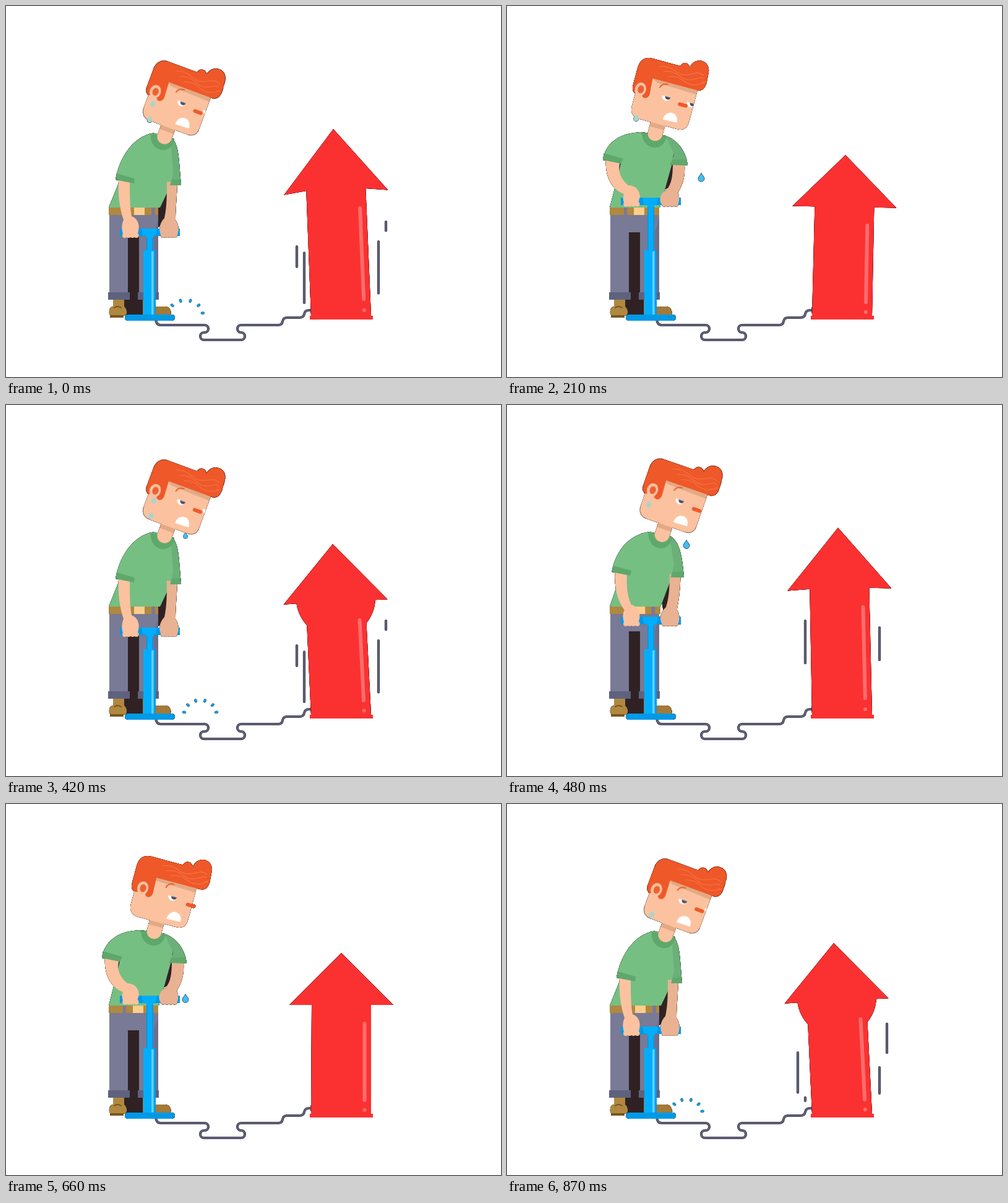
Write an HTML page that moves like this. It is 800 px wide and 600 px high and loops after 900 ms.

```html
<!DOCTYPE html>
<html lang="en">
<head>
<meta charset="utf-8">
<title>Pumping up</title>
<style>
html, body { margin: 0; width: 100%; height: 100%; overflow: hidden; background: #fff }
svg { display: block; width: 800px; height: 600px }
.edge { filter: drop-shadow(0 0 .5px #000) drop-shadow(0 0 .3px #000) }
</style>
</head>
<body>
<svg id="stage" viewBox="0 0 800 600"></svg>
<script>
const LOOP = 900, PUMP = 450, STEP = 30;
const SKIN = '#fcc29f', SKIN_DARK = '#e9b292', SKIN_SHADE = '#e3a984', HAIR = '#f05a28';
const SHIRT = '#76bf82', SHIRT_DARK = '#5fa86b', SLEEVE = '#6bb078';
const PANTS = '#787a96', CUFF = '#5f627e', BROWN = '#b08840', DARK = '#302224';
const BLUE = '#00aeff', BLUE_DARK = '#0099e6', RED = '#fb3131', LINE = '#62637b';

const stage = document.getElementById('stage');
const clamp = (v, a = 0, b = 1) => Math.min(b, Math.max(a, v));
const lerp = (a, b, k) => a + (b - a) * k;

// Blend two paths of the same structure.
function mix(a, b, k) {
  const to = b.match(/-?[\d.]+/g);
  let i = 0;
  return a.replace(/-?[\d.]+/g, n => lerp(+n, +to[i++], k).toFixed(2));
}

// Smooth value through [time, value] pairs.
function keys(t, pairs) {
  const i = Math.max(1, pairs.findIndex(k => k[0] >= t));
  const [t0, a] = pairs[i - 1], [t1, b] = pairs[i];
  const x = (t - t0) / (t1 - t0);
  return lerp(a, b, x * x * (3 - 2 * x));
}

const path = (d, fill) => `<path d="${d}" fill="${fill}"/>`;
const rect = (x, y, w, h, fill, r = 0) =>
  `<rect x="${x}" y="${y}" width="${w}" height="${h}" rx="${r}" fill="${fill}"/>`;
const oval = (x, y, rx, ry, fill) =>
  `<ellipse cx="${x}" cy="${y}" rx="${rx}" ry="${ry}" fill="${fill}"/>`;
const stroke = (d, color, width, extra = '') =>
  `<path d="${d}" fill="none" stroke="${color}" stroke-width="${width}" stroke-linecap="round" ${extra}/>`;
const outlined = d => stroke(d, '#3d3c4c', 4.2) + stroke(d, LINE, 2.4);
const group = (transform, body) => `<g transform="${transform}">${body}</g>`;
const clipped = (id, d, body) =>
  `<clipPath id="${id}"><path d="${d}"/></clipPath><g clip-path="url(#${id})">${body}</g>`;

function lift(u) {
  const half = PUMP / 2;
  const ease = x => 1 - (1 - x ** 1.2) ** 4.5;
  return u < half ? ease(u / half) : 1 - ease((u - half) / half);
}

function hose() {
  return outlined('M242 507Q243 516 250 516H321a6 6 0 0 1 0 12H320a6 6 0 0 0 0 12H380' +
    'a6 6 0 0 0 0-12a6 6 0 0 1 0-12H440q6 0 7-6q1-6 7-6H474q7 0 8-6q1-6 8-6H493') +
    rect(492, 487, 2, 10, '#3d3c4c');
}

function speedLines(t) {
  const w = t < 250 ? t + 420 : t <= 700 ? t : t - 480;
  // x, bottom, top, head start and end, tail start and end
  return [
    [614, 480, 349, 294, 395, 330, 431],
    [470, 480, 389, 330, 400, 381, 442],
    [602, 468, 360, 362, 434, 416, 540],
    [482, 480, 349, 388, 440, 425, 540],
  ].map(([x, low, high, h0, h1, t0, t1]) => {
    if (w < h0 || w > t1) return '';
    const head = lerp(low, high, clamp((w - h0) / (h1 - h0)));
    const tail = lerp(low, high, clamp((w - t0) / (t1 - t0)));
    return outlined(`M${x} ${head}V${tail}`);
  }).join('');
}

function arrow(t, u) {
  const lean = keys(t, [[0, -13], [90, 2], [210, 5], [330, -4], [420, -14], [540, 0],
    [660, 0], [780, -4], [870, -14], [900, -13]]);
  const tip = keys(u, [[0, 199], [90, 197], [210, 241], [330, 238], [420, 225], [450, 199]]);
  const wing = keys(u, [[0, 301.5], [90, 290], [210, 325], [330, 323], [420, 318.5], [450, 301.5]]);
  const notch = keys(u, [[0, 297], [90, 296], [210, 325], [330, 323], [420, 318], [450, 297]]);
  const mid = 542 + lean * .67, tilt = -lean * .3;
  const d = `M${542 + lean} ${tip}L${mid + 84} ${wing - tilt}L${mid + 48} ${notch - tilt / 2}` +
    `L590 501H593V507H491V501H493L${mid - 48} ${notch + tilt / 2}L${mid - 84} ${wing + tilt}Z`;
  // The bulge of air travels up the shaft and vanishes into the head.
  const bulgeY = 431 - (u - 330) * 1.32;
  const bulgeR = u < 270 ? 0 : Math.min(64, 507 - bulgeY) - Math.max(0, u - 420);
  const bulgeX = 542 + lean * .67 * (507 - bulgeY) / 200;
  const bulge = bulgeR > 0 ? clipped('shaft', `M440 ${wing - 4}H640V510H440Z`,
    oval(bulgeX, bulgeY, bulgeR, bulgeR, RED)) : '';
  const k = (notch - 297) / 28;
  const shine = `M${579.5 + lean * .57} ${notch + 30}L${579.5 + lean * .1} ${474 + 5 * k}`;
  return `<g class="edge">${bulge + path(d, RED)}</g>` +
    stroke(shine, '#ff6c6c', 6) + oval(579.5 + lean * .05, 492 + 3 * k, 3, 3, '#ff6c6c');
}

function teardrop(x, y, s, fill, line = 'none') {
  return group(`translate(${x} ${y}) scale(${s})`,
    `<path d="M0-7C1-4 5-1 5 2A5 5 0 0 1-5 2C-5-1-1-4 0-7Z" fill="${fill}" stroke="${line}"/>`);
}

function drips(t) {
  // x, start, gravity, landing, splash
  return [[314, 51, .00289, 368, 390], [290, 339, .00107, 845, 845]].map(([x, start, g, land, burst]) => {
    let out = '';
    const age = t - start;
    if (age > 0 && t < land)
      out += teardrop(x, 204 + g * age * age, clamp(age / 110), '#45bdf0', '#24566c');
    const since = (t - burst + LOOP) % LOOP;
    if (since < 70) {
      const r = 24 + since * .075;
      for (let i = 0; i < 6; i++) {
        const deg = 8 + i * 32.8, a = deg * Math.PI / 180;
        out += group(`translate(${x + r * Math.cos(a)} ${500 - r * .86 * Math.sin(a)}) rotate(${-deg})`,
          `<ellipse rx="3" ry="2" fill="#12a4e4" stroke="#1c5f80" stroke-width=".7"/>`);
      }
    }
    return out;
  }).join('');
}

function legs(p) {
  const shoe = 'M173 474H191V486Q196 491 195 497Q194 501 188 501H170Q166 500 167 492Q168 487 173 486Z';
  return rect(191, 470, 32, 30, DARK) + rect(196, 364, 20, 110, DARK) +
    path(shoe, BROWN) + rect(168, 500, 22, 4, '#7a5520', 1) +
    stroke('M175 488Q180 484 186 488', '#7a5520', 2) +
    path('M221 474H236V486H258Q267 487 267 500H221Z', '#a37a38') +
    path('M167 336H246V466H215V366H197V466H167Z', PANTS) +
    path('M246 345V466H238L239 366Z', '#6d6f8a') +
    rect(165, 463, 35, 12, CUFF) + rect(213, 463, 34, 12, CUFF) +
    rect(166, 325, lerp(83, 80, p), 13, BROWN) +
    rect(189, 325, 5, 13, PANTS) + rect(lerp(235, 230, p), 325, 6, 13, PANTS) +
    rect(lerp(207, 205, p), 325, 17, 13, '#ffcd8b');
}

function shirt(p) {
  return path(mix('M262 284L260 345L246 358L246 318Z', 'M264 250L271 262L266 290L255 297Z', p), DARK) +
    path(mix('M190 270L192 280L194 290L200 280Z', 'M190 242L177 254L181 270L188 276Z', p), DARK) +
    path(mix('M166 326L183 284L212 240L240 206L266 212L276 250L266 290L249 326Z',
      'M166 326L180 272L188 235L218 205L256 210L270 235L266 258L247 326Z', p), SHIRT);
}

function pump(p) {
  const y = 366 - 50 * p;
  return rect(227, y, 11, 398 - y, BLUE_DARK) + rect(229, y, 7, 398 - y, BLUE) +
    rect(222, 395, 20, 106, BLUE) + rect(235, 397, 3.5, 102, '#62cfff') + rect(239.5, 395, 2.5, 106, BLUE_DARK) +
    rect(192, 499, 81, 10, BLUE_DARK, 5) +
    rect(184, y - 6, 97, 12, BLUE_DARK, 1) +
    path(`M211 ${y - 6}H252L249 ${y + 5}H239L237 ${y + 9}H228L226 ${y + 5}H214Z`, BLUE) +
    path(`M211 ${y - 6}h8l2 11h-7ZM252 ${y - 6}h-8l-2 11h7Z`, BLUE_DARK);
}

function arms(p) {
  const y = 371 - 50.5 * p;
  const knuckles = (x, color) => stroke(`M${x} ${y}h19`, color, 8, 'stroke-dasharray="0 6.2"');
  return path(mix('M260 284L277 286C276 310 274 330 274 346C280 354 280 366 276 372L252 372C246 366 247 352 256 343C260 325 260 305 260 284Z',
    'M268 254L287 256C288 275 285 288 276 302C279 308 279 316 276 321L250 321C245 315 247 303 258 297C266 288 268 275 268 254Z', p), SKIN_DARK) +
    knuckles(254, SKIN_DARK) +
    path(mix('M182 280L200 283C200 305 200 325 203 340C214 344 216 355 214 364L212 371L190 371C186 362 187 352 190 346C183 325 181 305 182 280Z',
      'M160 247L183 252C178 268 184 280 196 290C208 290 214 298 215 308L212 319L190 319C187 316 187 308 189 304C168 296 158 275 160 247Z', p), SKIN) +
    knuckles(192, SKIN);
}

function sleeves(p) {
  return path(mix('M266 212C280 222 279 245 283 289L266 289L270 270C279 250 274 230 266 212Z',
      'M256 210C278 217 290 238 292 257L264 257C270 240 268 225 256 210Z', p), SLEEVE) +
    path(mix('M268 281L282 280L283 290L265 290Z', 'M267 249L290 248L292 258L263 257Z', p), SHIRT_DARK) +
    path(mix('M177 281C182 250 202 211 240 205L235 250L208 282Z', 'M155 249C158 225 178 205 218 204L200 240L186 250Z', p), SHIRT) +
    path(mix('M179 271L208 279L207 287L177 281Z', 'M157 238L188 247L184 255L155 249Z', p), SHIRT_DARK) +
    path(mix('M234 206C232 226 246 234 256 233C266 232 272 222 272 215Z',
      'M218 204C218 222 230 229 239 229C248 229 257 222 257 210Z', p), SHIRT_DARK);
}

function head(t, u, p) {
  const turn = keys(t, [[0, .37], [210, 0], [330, .15], [420, .33], [540, .82], [660, 1], [870, .42], [900, .37]]);
  const angle = keys(u, [[0, 20.3], [90, 15.8], [210, 15], [330, 8.5], [420, 20.3], [450, 20.3]]);
  const slide = (n, body) => group(`translate(${n * turn} 0)`, body);
  const face = 'M-48-100V-40Q-48-22-30-22H32Q48-22 48-38V-100Z';
  const hair = mix('M-48 -60C-53 -62 -55 -66 -55 -75L-55 -100C-55 -115 -48 -122 -36 -122L11 -122C13 -131 23 -131 26 -124C30 -145 58 -144 58 -121L59 -107C59 -97 55 -91 47 -91L-27 -91L-25 -65C-26 -55 -36 -55 -37 -62Z',
    'M-48 -60C-53 -62 -55 -66 -55 -75L-55 -100C-55 -115 -48 -122 -36 -122L17 -122C19 -131 29 -131 33 -124C37 -145 65 -144 65 -121L66 -107C66 -97 62 -91 54 -91L-19 -91L-18 -65C-19 -55 -29 -55 -30 -62Z', turn);
  const eye = x => path(`M${x - 7}-68.500h14a7 7 0 0 1-14 0Z`, '#fff') +
    path(`M${x - 2}-68.500h9a4.500 4.500 0 0 1-9 0Z`, '#4d4e66');
  const strands = [-112, -106, -100].map((y, i) =>
    stroke(`M${-22 + i * 9} ${y}q14-6 27 0t26-2t${20 - i * 9}-3`, '#f67a48', 1)).join('');
  const slip = (t + 190) % PUMP, slip2 = (t + 30) % PUMP;
  const sweat = (x, y) => teardrop(x, y, .85, '#a9d5cb');
  return group(`translate(${lerp(254.3, 238, p)} ${lerp(217, 212, p)}) rotate(${angle})`,
    rect(-12, -32, 24, 38, SKIN, 12) + rect(-12, -23, 24, 8, SKIN_SHADE) +
    path(face, SKIN) +
    clipped('face', face, path('M-28-92H48V-84L-18-86Z', SKIN_SHADE) + slide(20, eye(43.5))) +
    path(hair, '#ef5829') + slide(7, strands) +
    slide(5.5, oval(-41.5, -69, 9, 11, SKIN) + oval(-41, -69, 5, 6.5, '#ee6034')) +
    slide(12, eye(2) + stroke('M-12-80Q-10-88-1-88', HAIR, 2)) +
    slide(8, path('M6-31C6-50 29-50 29-32Z', '#fff')) +
    slide(15, stroke('M26-62H36', HAIR, 6)) +
    (slip < 215 ? sweat(-32, -55 + slip * .16) : '') +
    (t < 215 || t >= 420 && t < 650 ? sweat(-36, -54 + slip2 * .13) : ''));
}

function scene(t) {
  const u = t % PUMP, p = lift(u);
  return speedLines(t) + hose() + arrow(t, u) + drips(t) +
    `<g class="edge">${legs(p) + shirt(p) + pump(p) + arms(p) + sleeves(p) + head(t, u, p)}</g>`;
}

function draw() {
  const t = performance.now() % LOOP;
  stage.innerHTML = scene(Math.floor(t / STEP) * STEP);
  requestAnimationFrame(draw);
}
draw();
</script>
</body>
</html>
```
